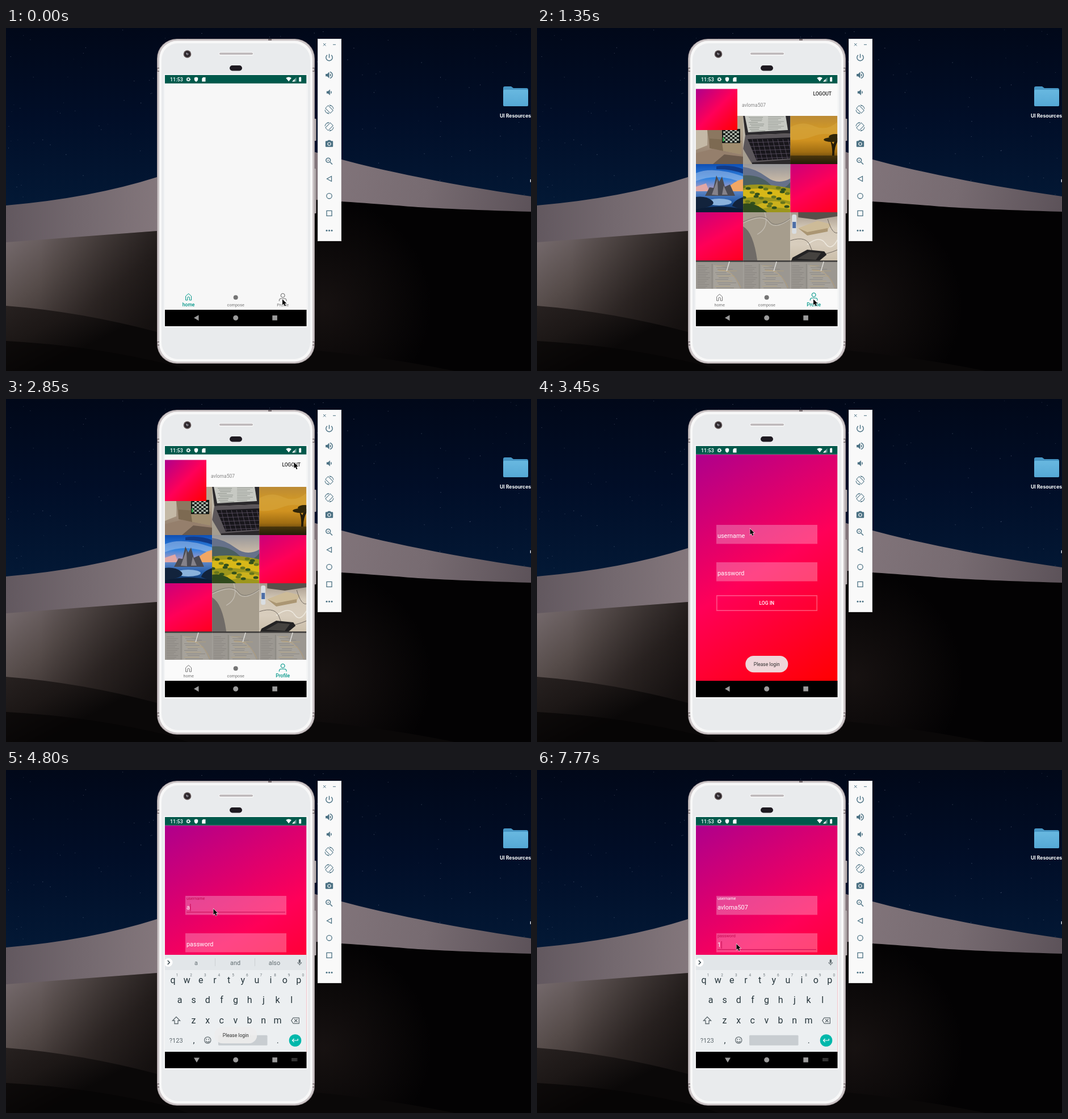
An HTML page with a canvas that plays this animation: 925x605 px, repeating every 8000 ms.

```html
<!DOCTYPE html>
<html lang="en">
<head>
<meta charset="utf-8">
<title>Login flow</title>
<style>
html, body { margin: 0; width: 100%; height: 100%; overflow: hidden; background: #000 }
canvas { display: block }
</style>
</head>
<body>
<canvas id="stage" width="925" height="605"></canvas>
<script>
const c = document.getElementById('stage').getContext('2d');
const LOOP = 8000, USER = 'avloma507', TEAL = '#009688', STEEL = '#4b7183';
const SCREEN = { x: 280, y: 83, w: 249.5, h: 443 };

// Drawing helpers
const clamp = v => Math.max(0, Math.min(1, v));
function box(x, y, w, h, fill, r = 0) {
  c.fillStyle = fill;
  c.beginPath(); c.roundRect(x, y, w, h, r); c.fill();
}
function frame(x, y, w, h, color, width = 1, r = 0) {
  c.strokeStyle = color; c.lineWidth = width;
  c.beginPath(); c.roundRect(x, y, w, h, r); c.stroke();
}
function disc(x, y, r, fill, ry = r) {
  c.fillStyle = fill;
  c.beginPath(); c.ellipse(x, y, r, ry, 0, 0, 7); c.fill();
}
function shape(d, fill) { c.fillStyle = fill; c.fill(new Path2D(d), 'evenodd'); }
function line(d, color, width = 1) {
  c.strokeStyle = color; c.lineWidth = width;
  c.stroke(new Path2D(d));
}
function text(s, x, y, size, color, align = 'center', weight = 400, family = 'Roboto') {
  c.font = `${weight} ${size}px ${family}, sans-serif`;
  c.fillStyle = color; c.textAlign = align;
  c.fillText(s, x, y);
}
function grad(x0, y0, x1, y1, ...colors) {
  const g = c.createLinearGradient(x0, y0, x1, y1);
  colors.forEach((color, i) => g.addColorStop(i / (colors.length - 1), color));
  return g;
}
function glow(x, y, r, color) {
  const g = c.createRadialGradient(x, y, 0, x, y, r);
  g.addColorStop(0, color); g.addColorStop(1, color.slice(0, 7) + '00');
  disc(x, y, r, g);
}
function at(x, y, scale, draw) {
  c.save(); c.translate(x, y); c.scale(scale, scale); draw(); c.restore();
}
function clipped(x, y, w, h, draw) {
  c.save(); c.beginPath(); c.rect(x, y, w, h); c.clip(); draw(); c.restore();
}
const icon = (d, x, y, size, color) =>
  at(x - size / 2, y - size / 2, size / 24, () => shape(d, color));
const sunset = (x, y, w, h) =>
  box(x, y, w, h, grad(x, y, x + w, y + h, '#ae008c', '#ff0058', '#ff0000'));

// Small seeded generator
function random(seed) {
  return () => (seed = seed * 16807 % 2147483647) / 2147483647;
}

const ICONS = {
  power: 'M13 3h-2v10h2V3zm4.83 2.17l-1.42 1.42C17.99 7.86 19 9.81 19 12c0 3.87-3.13 7-7 7s-7-3.13-7-7c0-2.19 1.01-4.14 2.58-5.42L6.17 5.17C4.23 6.82 3 9.26 3 12c0 4.97 4.03 9 9 9s9-4.03 9-9c0-2.74-1.23-5.18-3.17-6.83z',
  louder: 'M3 9v6h4l5 5V4L7 9H3zm13.5 3c0-1.77-1.02-3.29-2.5-4.03v8.05c1.48-.73 2.5-2.25 2.5-4.02zM14 3.23v2.06c2.89.86 5 3.54 5 6.71s-2.11 5.85-5 6.71v2.06c4.01-.91 7-4.49 7-8.77s-2.99-7.86-7-8.77z',
  softer: 'M18.5 12c0-1.77-1.02-3.29-2.5-4.03v8.05c1.48-.73 2.5-2.25 2.5-4.02zM5 9v6h4l5 5V4L9 9H5z',
  rotate: 'M16.48 2.52c3.27 1.55 5.61 4.72 5.97 8.48h1.5C23.44 4.84 18.29 0 12 0l-.66.03 3.81 3.81 1.33-1.32zm-6.25-.77c-.59-.59-1.54-.59-2.12 0L1.75 8.11c-.59.59-.59 1.54 0 2.12l12.02 12.02c.59.59 1.54.59 2.12 0l6.36-6.36c.59-.59.59-1.54 0-2.12L10.23 1.75zm4.6 19.44L2.81 9.17l6.36-6.36 12.02 12.02-6.36 6.36zm-7.31.29C4.25 19.94 1.91 16.76 1.55 13H.05C.56 19.16 5.71 24 12 24l.66-.03-3.81-3.81-1.33 1.32z',
  camera: 'M12 8.8a3.2 3.2 0 1 0 0 6.4 3.2 3.2 0 0 0 0-6.4zM9 2L7.17 4H4c-1.1 0-2 .9-2 2v12c0 1.1.9 2 2 2h16c1.1 0 2-.9 2-2V6c0-1.1-.9-2-2-2h-3.17L15 2H9zm3 15c-2.76 0-5-2.24-5-5s2.24-5 5-5 5 2.24 5 5-2.24 5-5 5z',
  zoom: 'M15.5 14h-.79l-.28-.27C15.41 12.59 16 11.11 16 9.5 16 5.91 13.09 3 9.5 3S3 5.91 3 9.5 5.91 16 9.5 16c1.61 0 3.09-.59 4.23-1.57l.27.28v.79l5 4.99L20.49 19l-4.99-5zm-6 0C7.01 14 5 11.99 5 9.5S7.01 5 9.5 5 14 7.01 14 9.5 11.99 14 9.5 14zm2.5-4h-2v2H9v-2H7V9h2V7h1v2h2v1z',
  erase: 'M22 3H7c-.69 0-1.23.35-1.59.88L0 12l5.41 8.11c.36.53.9.89 1.59.89h15c1.1 0 2-.9 2-2V5c0-1.1-.9-2-2-2zm0 16H7.07L2.4 12l4.66-7H22v14zm-11.59-2L14 13.41 17.59 17 19 15.59 15.41 12 19 8.41 17.59 7 14 10.59 10.41 7 9 8.41 12.59 12 9 15.59z',
  mic: 'M12 14c1.66 0 3-1.34 3-3V5c0-1.66-1.34-3-3-3S9 3.34 9 5v6c0 1.66 1.34 3 3 3zm5-3c0 2.76-2.24 5-5 5s-5-2.24-5-5H5c0 3.53 2.61 6.43 6 6.92V21h2v-3.08c3.39-.49 6-3.39 6-6.92h-2z',
  enter: 'M19 7v4H5.83l3.58-3.59L8 6l-6 6 6 6 1.41-1.41L5.83 13H21V7z'
};

function wallpaper() {
  box(0, 0, 925, 605, grad(0, 0, 0, 320, '#010819', '#010e28', '#031936'));
  const rnd = random(77);
  for (let i = 0; i < 150; i++) {
    c.globalAlpha = .12 + rnd() * .4;
    box(rnd() * 925, rnd() * 300, 1, 1, '#a9b4cc');
  }
  c.globalAlpha = 1;
  shape('M0 313Q150 300 266 263L300 250V400H0Z', grad(0, 0, 280, 0, '#62585f', '#74696f', '#85787d'));
  shape('M520 211L545 219C640 247 760 273 925 297V340H520Z', grad(560, 240, 925, 320, '#82757b', '#776b71', '#5c5259'));
  shape('M500 300Q640 309 700 314T925 324V605H500Z', '#030203');
  glow(560, 490, 190, '#1b1514d0');

  // Near dune, lit from the upper left
  shape('M0 378L266 358H540V605H0Z', grad(0, 380, 170, 590, '#73686a', '#564c4a', '#342c2a', '#1d1817'));
  shape('M0 378L266 358H540V605H0Z', grad(60, 0, 300, 0, '#0a070700', '#0a070788'));
  shape('M0 490Q130 500 266 536L540 568Q680 582 790 605H0Z', grad(0, 490, 60, 605, '#272120', '#1c1716', '#0a0808'));
  shape('M0 552Q150 560 290 594L320 605H0Z', '#050404aa');

  shape('M876 106q0-3 3-3h11l4 3h23q3 0 3 3v26q0 3-3 3h-38q-3 0-3-3z', '#4796c4');
  box(876, 109, 44, 29, grad(0, 109, 0, 138, '#68b8e0', '#55a8d5'), 2);
  text('UI Resources', 870, 157.5, 8.6, '#fff', 'left', 700, 'Inter');
  box(923.5, 267, 2, 5, '#c9ccd2');
}

function toolbar() {
  box(549, 19, 42, 357, '#f9f9f9');
  frame(549.5, 19.5, 41, 356, '#dedede');
  line('M559 27l4.5 4.5M563.5 27l-4.5 4.5M576 29.3h5', STEEL, 1);
  const x = 569.5;
  icon(ICONS.power, x, 52, 17, STEEL);
  icon(ICONS.louder, x, 83, 17, STEEL);
  icon(ICONS.softer, x, 113.5, 16, STEEL);
  icon(ICONS.rotate, x, 143.5, 16, STEEL);
  at(x, 174, 1, () => { c.scale(-1, 1); icon(ICONS.rotate, 0, 0, 16, STEEL); });
  icon(ICONS.camera, x, 204.5, 16, STEEL);
  icon(ICONS.zoom, x, 235, 17, STEEL);
  line('M573.5 261.5v9l-8-4.5z', STEEL, 1.3);
  c.beginPath(); c.arc(x, 296.3, 4.7, 0, 7); c.stroke();
  frame(565, 322.3, 9, 9, STEEL, 1.3);
  for (const dx of [-4.5, 0, 4.5]) disc(x + dx, 357.3, 1.5, STEEL);
}

function phone() {
  for (const [y, h] of [[160, 39], [248, 79]]) {
    box(542, y, 4.5, h, '#cbc4c5', 1.5);
    box(545.5, y, 1, h, '#6b6164');
  }
  box(266, 19, 278, 573, '#a1989a', 35);
  box(267, 20, 276, 571, '#cdc6c8', 34);
  box(270, 22.5, 270, 566, '#f8f8f8', 32);
  box(274, 27, 262, 557, '#e9ebed', 29);
  box(278, 81, 254, 447, '#f3f4f5', 1);
  for (const y of [70, 553]) {
    box(266, y, 4, 7, '#74696c'); box(267, y + 1.5, 3, 4, '#cfc9ca');
    box(540, y, 4, 7, '#74696c'); box(540, y + 1.5, 3, 4, '#cfc9ca');
  }
  box(462, 19, 6, 3, '#746a6d');
  disc(319.5, 46, 6.8, '#5b5051');
  disc(319.5, 46, 5, '#252025');
  disc(319.5, 46, 2.3, '#6f6a72');
  disc(318, 44.5, 1, '#a7a2a6');
  box(375, 42.5, 61, 6, '#f8f8f8', 3);
  box(376, 43.5, 59, 3.5, '#bdb7b9', 1.7);
  box(394, 66, 22, 9.5, '#1e1a21', 4.7);
}

function statusBar() {
  box(SCREEN.x, SCREEN.y, SCREEN.w, 14.7, '#00594b');
  text('11:53', 289, 94, 9, '#fff', 'left', 500);
  c.setLineDash([1.3, 1.05]);
  c.strokeStyle = '#fff'; c.lineWidth = 1.3;
  c.beginPath(); c.arc(321.3, 90.5, 3.2, 0, 7); c.stroke();
  c.setLineDash([]);
  c.beginPath(); c.arc(321.3, 90.5, 2.1, 0, 7); c.stroke();
  shape('M335 86.5l3.2 1.3v2.5q0 3-3.2 4.5q-3.2-1.5-3.2-4.5v-2.5z', '#fff');
  shape('M347.2 87h4.3v7.5h-6.2v-5.5z', '#fff');
  shape('M493.3 88.3q4.8-3.6 9.6 0l-4.8 6z', '#fff');
  shape('M511.5 87v7.5h-7.5z', '#ffffff66');
  shape('M508.5 90v4.5h-4.5z', '#fff');
  shape('M517 87h.8v-.8h1.4v.8h.9v7.5h-3.9v-7.5z', '#fff');
}

function navBar(keyboardOpen) {
  const grey = '#9b9b9b';
  box(SCREEN.x, 497, SCREEN.w, 29, '#000');
  shape(keyboardOpen ? 'M331 507.5h10l-5 8.5z' : 'M339.5 506.3v10l-8.5-5z', grey);
  disc(404.7, 511.3, 4.5, grey);
  box(469.3, 507, 8.6, 8.6, grey);
  if (!keyboardOpen) return;
  for (let row = 0; row < 3; row++)
    for (let i = 0; i < 5; i++) box(503.5 + i * 2.1, 508.3 + row * 2, 1.2, 1.1, '#8a8a8a');
}

// Photo tiles, each drawn in an 84 x 85 cell
const photos = {
  room() {
    box(0, 0, 84, 85, grad(0, 25, 0, 85, '#b3a792', '#a08d7a', '#8b7867'));
    shape('M0 25H20V52L0 60Z', '#c4b9a6');
    shape('M20 25H46V52L24 56Z', '#8b7760');
    shape('M24 40L80 44V67L46 62L24 57Z', '#7d6a52');
    shape('M46 47L80 45V68L48 62Z', '#a08d6f');
    box(46, 23, 32, 25, '#151a17');
    for (let i = 0; i < 49; i++)
      if (i % 2) box(48 + i % 7 * 4, 24 + Math.floor(i / 7) * 3.3, 4, 3.3, '#aeb6ab');
    box(47, 38, 3, 7, '#2e9e49');
    shape('M0 66L30 58L84 70V85H0Z', '#957f6c');
    shape('M30 85L50 68L84 72V85Z', '#6c5b4d');
  },
  laptop() {
    box(0, 0, 84, 85, '#b9b2a4');
    shape('M0 0H84V31L4 34Z', '#2b292c');
    shape('M3 0H75L79 25L9 29Z', '#c7c9c3');
    for (let i = 0; i < 9; i++) {
      box(10 + i % 3 * 2, 2 + i * 3, 25 - i % 4 * 3, 1, '#8e938c');
      box(44, 1 + i * 2.8, 28 - i % 3 * 5, 1, '#9a9e97');
    }
    shape('M4 34L84 31V85H14L0 58Z', '#5b565a');
    shape('M8 41L84 38V75L24 79Z', '#18161b');
    for (let row = 0; row < 5; row++)
      line(`M${10 + row * 3} ${47 + row * 7}L84 ${45 + row * 7}`, '#5c5264', .8);
    for (let i = 0; i < 8; i++) line(`M${16 + i * 9} 41l9 37`, '#5c5264', .8);
    shape('M0 58L16 85H0Z', '#a59d8f');
    shape('M16 82L84 77V85H16Z', '#2a272a');
  },
  savanna() {
    box(0, 0, 84, 85, grad(0, 0, 0, 85, '#bb8a35', '#cf9728', '#d09220', '#a06d12', '#332408'));
    shape('M0 20Q20 8 42 18T84 10V35Q60 28 40 36T0 42Z', '#d9a94377');
    shape('M70 42Q76 58 73 76H78Q76 58 84 44L80 40L76 50Z', '#241b08');
    disc(73, 42, 14, '#2f2509', 4);
    disc(80, 37, 12, '#2f2509', 5);
    box(0, 70, 84, 15, grad(0, 70, 0, 85, '#4a360c', '#231c08'));
  },
  castle() {
    box(0, 0, 84, 85, grad(0, 0, 0, 50, '#0f4fb4', '#2f83e0', '#d6a0b4'));
    shape('M0 16Q30 3 84 22V34Q40 14 0 30Z', '#a9c4ea88');
    shape('M36 4Q60 0 84 9V17Q60 8 36 9Z', '#123a86');
    shape('M52 46Q66 30 84 26V50Z', '#f2a764');
    shape('M0 40L18 34L24 50H0Z', '#e0a7a5');
    box(0, 48, 84, 37, grad(0, 48, 0, 85, '#5f86c4', '#215ba8', '#0d2749'));
    shape('M16 56L24 41L31 42L36 20L41 31L46 22L51 40L60 36L69 56Z', '#4a4a52');
    shape('M28 54L38 26L39 55ZM46 54L49 38L56 54Z', '#85828a');
    disc(41, 67, 22, '#8ab2dc', 6);
    shape('M0 58Q18 56 28 64T12 78L0 85ZM84 58Q66 64 64 74L84 82Z', '#12233c');
    shape('M0 80Q40 70 84 80V85H0Z', '#0b1c36');
  },
  valley() {
    box(0, 0, 84, 85, grad(0, 0, 0, 30, '#96969a', '#c9b9a6'));
    shape('M0 5Q22 8 42 23T84 25V55H0Z', '#66718a');
    shape('M0 20Q30 18 48 36T84 31V60H0Z', '#4a5f60');
    shape('M0 38Q35 32 84 43V85H0Z', '#9d961c');
    shape('M0 46Q40 38 84 52V66Q40 54 0 60Z', '#d8b818');
    shape('M20 74Q54 58 84 72V80Q50 72 20 82Z', '#ccb11c');
    for (let i = 0; i < 26; i++)
      disc(i * 23 % 84, 40 + i * 17 % 42, 4.5, i % 2 ? '#33501c' : '#66751c', 2.5);
    shape('M0 70Q20 66 42 85H0Z', '#2f4a1c');
  },
  sunset() { sunset(0, -33, 84, 151); },
  cable() {
    box(0, 0, 84, 85, '#a69d8d');
    shape('M0 25Q18 35 25 85H0Z', '#706b67');
    line('M0 19Q35 2 45 17T83 12M38 0Q47 27 25 39', '#c4beb4', 1.2);
    line('M0 17Q35 0 46 15T84 10', '#77736c', .8);
  },
  desk() {
    box(0, 0, 84, 85, grad(0, 0, 0, 85, '#a3968a', '#d4c9b8', '#d8cdbd', '#c9bda9'));
    shape('M14 0H84V7L45 13L14 9Z', '#57504a');
    shape('M14 28L48 15L72 21L66 31L30 38Z', '#cdbb98');
    shape('M14 28L30 35L66 28V34L30 41Z', '#ab9673');
    box(3, 4, 8, 34, '#d9dde1', 3); box(4, 17, 6, 11, '#4d6ea6');
    line('M30 57Q52 40 62 55T84 47', '#eee9df', 1.5);
    line('M0 50Q30 40 36 62T84 66M66 12Q74 40 84 36', '#6f675f', 1);
    shape('M4 80L30 66L60 69L64 75L52 85H2Z', '#232223');
    shape('M12 82L33 70L54 72L45 84Z', '#45423f');
  },
  code() {
    box(0, 0, 84, 85, '#9b9791');
    box(0, 0, 84, 2.5, '#3d3b3a');
    shape('M31 8Q62 8 78 50H31Z', '#a6a29b');
    for (let i = 0; i < 14; i++) {
      box(3, 9 + i * 3, 13 + i * 7 % 10, .8, '#84817c');
      box(34 + i % 4 * 2, 9 + i * 3, 17 + i * 5 % 17, .8, i % 3 ? '#85817b' : '#b3a07a');
    }
    box(28, 6, 1, 48, '#84817b');
    line('M59 2L54 19', '#deddd9', 1.5);
    line('M38 17Q65 14 79 48', '#b7a07a', 1);
  }
};
const GRID = ['room', 'laptop', 'savanna', 'castle', 'valley', 'sunset', 'sunset', 'cable', 'desk', 'code', 'code', 'code'];

function tabs(profileOpen) {
  const tab = (label, x, on) => {
    const color = on ? TEAL : '#757575';
    text(label, x, 491, on ? 8.5 : 7.3, color, 'center', on ? 500 : 400);
    return color;
  };
  const home = tab('home', 321.6, !profileOpen), hy = profileOpen ? 475.5 : 474.5;
  at(321.6, hy, 1, () => line('M-5 -1.5L0 -6L5 -1.5V5.5H1.8V1.5A1.8 1.8 0 0 0 -1.8 1.5V5.5H-5Z', home, 1));
  tab('compose', 404.7, false);
  disc(404.7, 475.2, 4, '#757575');
  const person = tab('Profile', 487.7, profileOpen), py = profileOpen ? 474 : 475;
  at(487.7, py, 1, () => line('M3.4 -3.3A3.4 3.4 0 1 1 -3.4 -3.3A3.4 3.4 0 1 1 3.4 -3.3M-6.3 6.8V5.5Q-6.3 2.2 -3 2.2H3Q6.3 2.2 6.3 5.5V6.8', person, 1.1));
}

function feed(t) {
  const profileOpen = t >= 600;
  box(SCREEN.x, 98, SCREEN.w, 399, profileOpen ? '#fafafa' : '#f7f7f7');
  if (profileOpen) {
    if (t >= 1200) clipped(SCREEN.x, 155, SCREEN.w, 305, () => GRID.forEach((name, i) => {
      const x = SCREEN.x + i % 3 * 83.1, y = 155 + Math.floor(i / 3) * 85;
      clipped(x, y, 83.3, 85, () => at(x, y, 1, photos[name]));
    }));
    sunset(280, 107.5, 73, 72.5);
    text('LOGOUT', 502.7, 118.6, 8.5, '#212121', 'center', 500);
    text(USER, 361, 139.3, 8.5, '#858585', 'left');
    if (t < 1200) box(445, 438, 84.5, 59, '#fdfdfd');
  }
  tabs(profileOpen);
}

function field(y, hint, value, focused) {
  const accent = '#c4074f', open = focused || value;
  box(316, y, 178, 33.5, '#ffffff45');
  text(hint, 318, open ? y + 7 : y + 23, open ? 7.3 : 10.9, focused ? accent : '#fff', 'left');
  text(value, 318, y + 24, 10.9, '#fff', 'left');
  if (!focused) return;
  box(318, y + 28.3, 174, 1, accent);
  box(318.5 + c.measureText(value).width, y + 14, 1, 13, accent);
}

function login(t, typed) {
  sunset(SCREEN.x, 98, SCREEN.w, 399);
  const onPassword = t >= 7350;
  field(222, 'username', typed, t >= 3900 && !onPassword);
  field(288, 'password', t >= 7800 ? '1' : '', onPassword);
  frame(316.8, 346.8, 176.4, 26.4, '#ffffff4d', 1.7);
  text('LOG IN', 404.8, 363, 8.5, '#fff', 'center', 500);
}

function suggestions(n) {
  if (n === 1) return ['a', 'and', 'also'];
  if (n === 2) return ['av', 'average', 'available'];
  return n > 2 && n < 7 ? ['', USER.slice(0, n), ''] : [];
}

function keyboard(n) {
  const ink = '#26353b', soft = '#5d686d';
  box(SCREEN.x, 326, SCREEN.w, 171, '#eceff1');
  box(SCREEN.x, 326, SCREEN.w, 27, '#e2e6e9');
  disc(286, 339.5, 7.5, '#fff');
  line('M284.8 336l3.5 3.5l-3.5 3.5', ink, 1.3);
  icon(ICONS.mic, 517.3, 339.5, 13, soft);
  const words = suggestions(n);
  words.forEach((word, i) => text(word, 335 + i * 69, 343.5, 10.9, '#626d72'));
  if (words.length) for (const x of [368, 438]) box(x, 332, 1, 14, '#cbd0d3');

  const row = (keys, x, y) => [...keys].forEach((key, i) => text(key, x + i * 24.65, y, 16, ink));
  row('qwertyuiop', 294, 375.5);
  [...'1234567890'].forEach((d, i) => text(d, 301.5 + i * 24.65, 364, 6.5, '#6f797e'));
  row('asdfghjkl', 306, 411);
  row('zxcvbnm', 330.5, 446.5);
  line('M300 435.5l6.5 6.5h-3.5v5.5h-6v-5.5h-3.5z', soft, 1.3);
  icon(ICONS.erase, 509.5, 442, 15, soft);
  text('?123', 299.7, 480.5, 11, soft);
  text(',', 331, 482, 15, ink);
  text('.', 478.7, 482, 15, ink);
  c.strokeStyle = soft; c.lineWidth = 1.2;
  c.beginPath(); c.arc(355.3, 476.5, 5.6, 0, 7); c.stroke();
  c.beginPath(); c.arc(355.3, 477, 3, .2, 2.95); c.stroke();
  disc(353.3, 475, .9, soft); disc(357.3, 475, .9, soft);
  box(374, 467.7, 86.5, 18, '#c8cdd1', 1.5);
  disc(509.5, 477, 10.8, '#00b8ab');
  icon(ICONS.enter, 509.5, 477, 14, '#fff');
}

function toast(alpha) {
  if (alpha <= 0) return;
  c.globalAlpha = alpha;
  box(367.3, 453, 75, 29.3, '#eeeeeee6', 14.5);
  text('Please login', 404.8, 471, 8.5, '#303030');
  c.globalAlpha = 1;
}

// Pointer tip: time, x, y
const POINTER = [
  [0, 487, 478.5], [1350, 487, 478.5], [1500, 525, 200], [1650, 531, 145], [1800, 527, 93],
  [2100, 511, 108], [2250, 507.5, 112], [3000, 507.5, 112], [3150, 455, 155], [3300, 398, 210],
  [3450, 375.5, 229], [3750, 365.5, 245], [6300, 365.5, 245], [6600, 355, 305], [6750, 352, 321],
  [7050, 352, 327], [7350, 351.5, 307], [8000, 351.5, 307]
];
function pointer(t) {
  const i = POINTER.findIndex(p => p[0] > t);
  const [t0, x0, y0] = POINTER[i - 1], [t1, x1, y1] = POINTER[i];
  const k = (t - t0) / (t1 - t0);
  at(x0 + (x1 - x0) * k, y0 + (y1 - y0) * k, .92, () => {
    const arrow = 'M0 0V11L2.6 8.7L4.5 13L6.4 12.2L4.5 8H8Z';
    line(arrow, '#ffffffcc', 1.3);
    shape(arrow, '#000');
  });
}

function lettersTyped(t) {
  if (t < 4800) return 0;
  return t < 6000 ? Math.min(6, 1 + (t - 4800) / 150) : Math.min(9, 7 + (t - 6000) / 150);
}

function render(now) {
  const raw = now % LOOP;
  const t = Math.floor((raw + (raw > 5600 ? 30 : 0)) / 150) * 150;
  const n = lettersTyped(t);
  wallpaper();
  phone();
  toolbar();
  clipped(SCREEN.x, SCREEN.y, SCREEN.w, 414, () => {
    const enter = clamp((t - 2850) / 300), rise = clamp((t - 3900) / 300);
    if (enter < 1) feed(t);
    if (enter > 0) {
      c.globalAlpha = enter;
      at(0, (1 - enter) * 30, 1, () => login(t, USER.slice(0, n)));
      c.globalAlpha = 1;
    }
    if (rise > 0) at(0, (1 - rise) * 171, 1, () => keyboard(n));
    toast(Math.min(clamp((t - 3000) / 300), clamp((6000 - t) / 450)));
    statusBar();
  });
  navBar(t >= 4050);
  pointer(t);
  requestAnimationFrame(tick);
}
const start = performance.now();
function tick() { render(performance.now() - start); }
tick();
</script>
</body>
</html>
```
